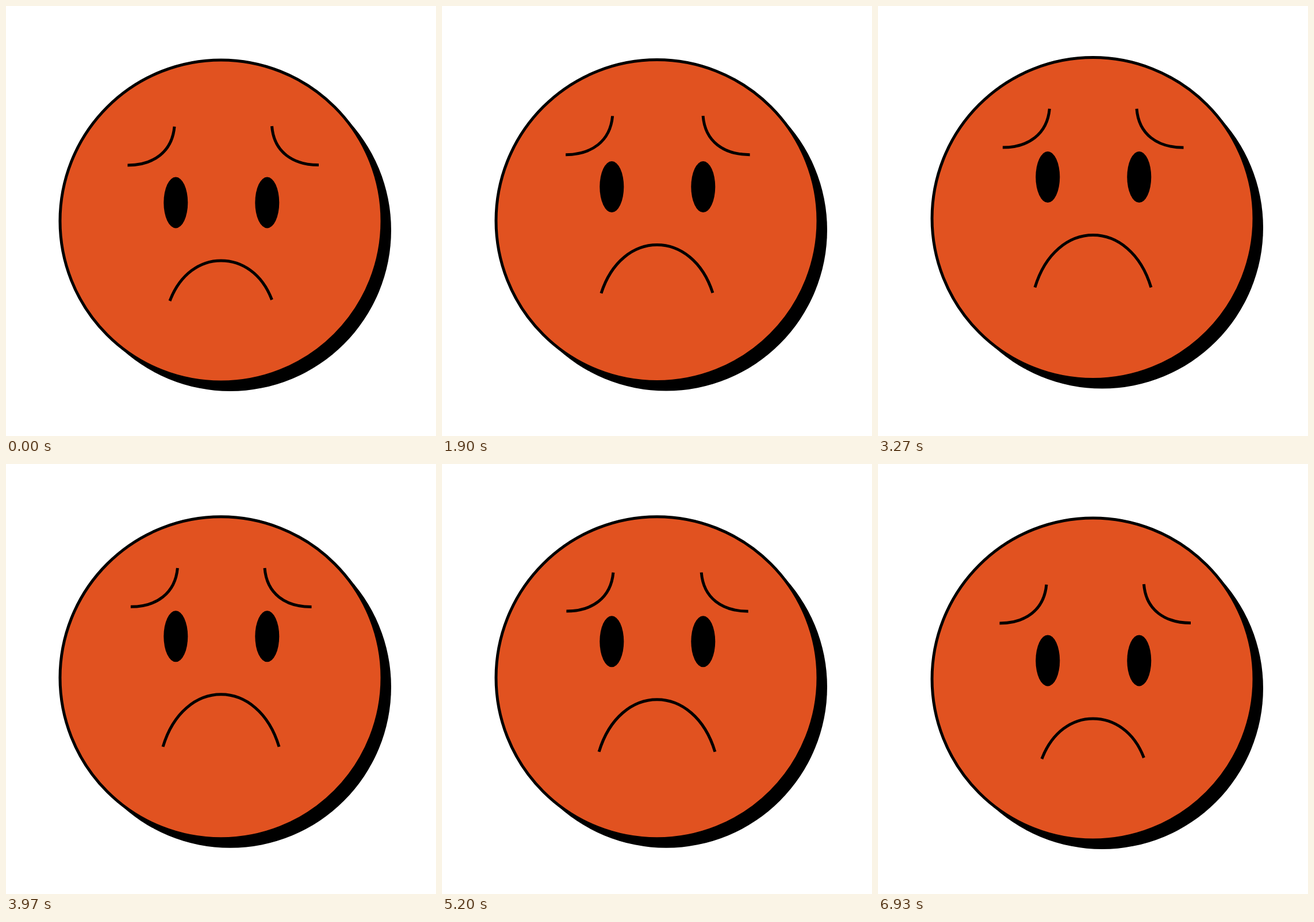
An HTML page that plays this animation: 748 by 748 pixels, repeating every 6.96 s.

```html
<!DOCTYPE html>
<html lang="en">
<head>
<meta charset="utf-8">
<title>Sad face</title>
<style>
  html, body { margin: 0; width: 100%; height: 100%; overflow: hidden; background: #fff; }
  svg { display: block; width: 100vw; height: 100vh; }
  .line { fill: none; stroke: #000; stroke-width: 5; }
</style>
</head>
<body>
<svg viewBox="0 0 748 748">
  <g id="head">
    <circle cx="390" cy="390" r="280"/>
    <circle cx="374" cy="374" r="280" fill="#e15220" stroke="#000" stroke-width="5"/>
    <g id="face">
      <ellipse cx="295.3" cy="342" rx="21" ry="44.5"/>
      <ellipse cx="454.3" cy="342" rx="21" ry="44.5"/>
      <path id="browL" class="line" d="M293 209.7C289 254 256 277 211.5 277"/>
      <path id="browR" class="line" d="M462.5 209C466 254 499 276.5 544 276.5"/>
      <path id="mouth" class="line"/>
    </g>
  </g>
</svg>
<script>
const PERIOD = 2320;
const $ = id => document.getElementById(id);
const mix = (a, b, p) => a + (b - a) * p;
const ease = (t, from, to) => {
  const x = Math.min(1, Math.max(0, (t - from) / (to - from)));
  return (1 - Math.cos(Math.PI * x)) / 2;
};
// 0 at rest, 1 when raised
const swing = (t, riseEnd, fallStart, fallEnd) =>
  ease(t, 0, riseEnd) - ease(t, fallStart, fallEnd);
const move = (id, x, y) => $(id).setAttribute('transform', `translate(${x} ${y})`);

const restMouth = [285, 513, 303, 466, 338, 443, 374, 443, 445, 465, 462.5, 511];
const deepMouth = [273, 534, 291, 474, 332, 443, 374, 443, 457, 474, 475, 534];

function draw(t) {
  move('head', 0, -4.8 * swing(t, 1160, 1160, 2080));
  move('face', 0, -40 * swing(t, 820, 1650, 2300));

  const brow = swing(t, 700, 1650, 2300);
  move('browL', 5.4 * brow, 13.5 * brow);
  move('browR', -12.5 * brow, 14.2 * brow);

  const frown = swing(t, 595, 1650, 2300);
  const m = restMouth.map((v, i) => mix(v, deepMouth[i], frown));
  $('mouth').setAttribute('d', `M${m.slice(0, 2)}C${m.slice(2, 8)}S${m.slice(8)}`);
}

const start = performance.now();
function tick() {
  draw((performance.now() - start) % PERIOD);
  requestAnimationFrame(tick);
}
tick();
</script>
</body>
</html>
```
